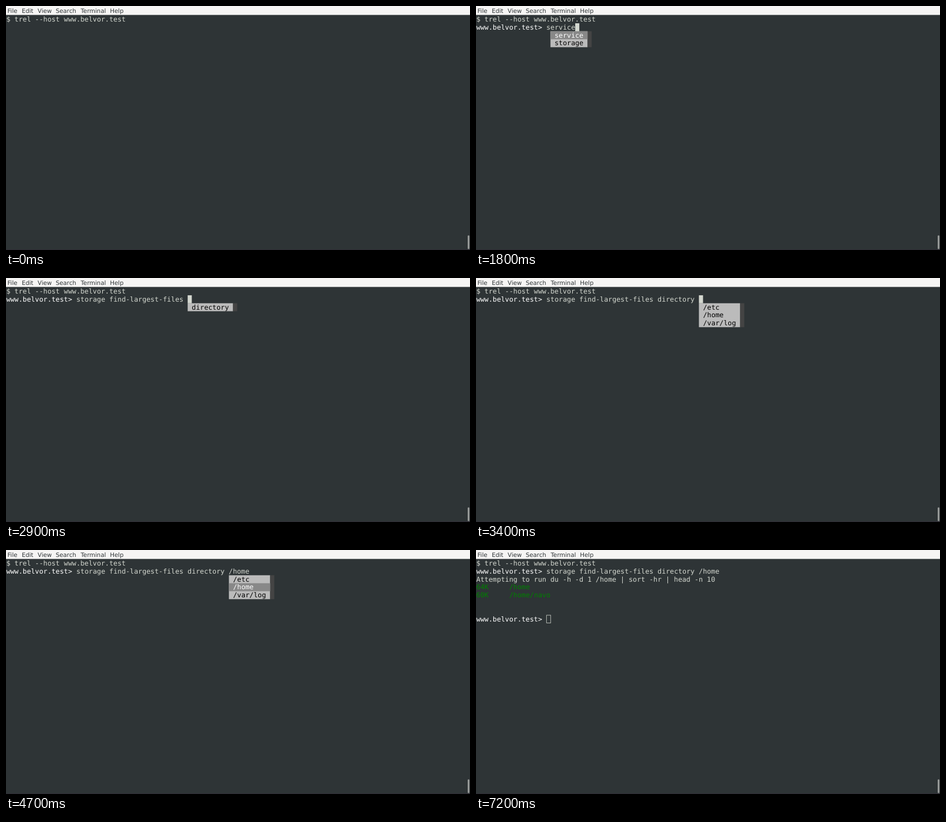
Recreate the animation shown at these times as an HTML page. Size 800 by 423 pixels, loop 7900 ms.

```html
<!DOCTYPE html>
<html lang="en">
<head>
<meta charset="utf-8">
<title>Terminal session</title>
<style>
html, body { margin: 0; width: 100%; height: 100%; overflow: hidden; background: #2e3436; }
svg { display: block; width: 800px; height: 423px; }
text { white-space: pre; text-rendering: geometricPrecision; }
#bar text { font: 10.3px "DejaVu Sans", sans-serif; fill: #2e3436; }
#screen text { font: 11.81px "DejaVu Sans Mono", monospace; }
</style>
</head>
<body>
<svg viewBox="0 0 800 423">
  <rect width="800" height="423" fill="#2e3436"/>
  <g id="bar">
    <rect width="800" height="15.5" fill="#f6f5f4"/>
    <text x="2.4" y="11.7">File</text>
    <text x="27.2" y="11.7">Edit</text>
    <text x="54.6" y="11.7">View</text>
    <text x="85.7" y="11.7">Search</text>
    <text x="128.8" y="11.7">Terminal</text>
    <text x="179.2" y="11.7">Help</text>
  </g>
  <rect y="422" width="800" height="1" fill="#302c36"/>
  <rect x="796" y="397.5" width="3" height="24" rx="1.5" fill="#969998"/>
  <g id="screen"></g>
</svg>
<script>
const LOOP = 7900, CW = 7.11, RH = 13.83, X0 = 0.4, Y0 = 16.1;
const FG = '#d3d7cf', GREEN = '#008000';
const HOST = 'www.belvor.test', PROMPT = HOST + '>', IN = PROMPT.length + 1;

const find = 'storage find-largest-files', dir = find + ' directory';
const areas = { col: IN + 1, items: ['service', 'storage'] };
const actions = { col: IN + 8, items: ['find-largest-files'] };
const options = { col: IN + find.length + 1, items: ['directory'] };
const paths = { col: IN + dir.length + 1, items: ['/etc', '/home', '/var/log'] };
const pick = (menu, sel) => ({ ...menu, sel });

// Each step: start time, stage (0 shell, 1 prompt, 2 running, 3 printing, 4 done),
// typed command, cursor ('on', 'off', 'hollow'), menu
const steps = [
  [0, 0, '', 'off'],
  [300, 0, '', 'on'],
  [400, 0.5, '', 'on'],
  [900, 1, '', 'on'],
  [1000, 1, '', 'off'],
  [1300, 1, 's', 'on'],
  [1400, 1, 's', 'on', areas],
  [1800, 1, 'service', 'on', pick(areas, 0)],
  [1900, 1, 'storage', 'on', pick(areas, 1)],
  [2000, 1, 'storage ', 'on'],
  [2100, 1, 'storage ', 'on', actions],
  [2300, 1, find, 'on', pick(actions, 0)],
  [2900, 1, find + ' ', 'on', options],
  [3200, 1, dir, 'on', pick(options, 0)],
  [3300, 1, dir + ' ', 'on'],
  [3400, 1, dir + ' ', 'on', paths],
  [3900, 1, dir + ' /etc', 'on', pick(paths, 0)],
  [4100, 1, dir + ' /home', 'on', pick(paths, 1)],
  [4700, 1, dir + ' /home', 'off', pick(paths, 1)],
  [5100, 2, dir + ' /home', 'on'],
  [5200, 3, dir + ' /home', 'on'],
  [5300, 4, dir + ' /home', 'on'],
  [5700, 4, dir + ' /home', 'off'],
  [6300, 4, dir + ' /home', 'on'],
  [6900, 4, dir + ' /home', 'off'],
  [7200, 4, dir + ' /home', 'hollow']
];

const px = col => X0 + col * CW;
const py = row => Y0 + row * RH;
const text = (row, col, str, fill = FG) =>
  `<text x="${px(col)}" y="${py(row) + 10.9}" fill="${fill}">${str}</text>`;
const box = (row, col, cols, rows, fill) =>
  `<rect x="${px(col)}" y="${py(row)}" width="${cols * CW}" height="${rows * RH}" fill="${fill}"/>`;

function drawMenu({ col, items, sel }) {
  const width = Math.max(...items.map(s => s.length)) + 2;
  let out = box(2, col, width, items.length, '#bbbbbb') +
            box(2, col + width, 1, items.length, '#444444');
  items.forEach((item, i) => {
    if (i === sel) out += box(2 + i, col, width, 1, '#888888');
    out += text(2 + i, col + 1, item, i === sel ? '#ffffff' : '#000000');
  });
  return out;
}

function drawCursor(stage, typed, look) {
  const [row, col] = {
    0: [0, 29], 0.5: [1, 0], 1: [1, IN + typed.length],
    2: [2, 0], 3: [3, 0], 4: [7, IN]
  }[stage];
  if (look === 'on') return box(row, col, 1, 1, FG);
  if (look === 'off') return '';
  return `<rect x="${px(col) + 0.4}" y="${py(row) + 0.1}" width="${CW}" height="${RH - 0.4}"
    fill="none" stroke="${FG}" stroke-width="0.8"/>`;
}

function draw([, stage, typed, look, menu]) {
  let out = text(0, 0, '$ trel --host ' + HOST);
  if (stage >= 1) out += text(1, 0, PROMPT, '#ffffff') + text(1, IN, typed);
  if (stage >= 3) out += text(2, 0, 'Attempting to run du -h -d 1 /home | sort -hr | head -n 10');
  if (stage >= 4) {
    out += text(3, 0, '64K', GREEN) + text(3, 8, '/home', GREEN) +
           text(4, 0, '60K', GREEN) + text(4, 8, '/home/navo', GREEN) +
           text(7, 0, PROMPT, '#ffffff');
  }
  if (menu) out += drawMenu(menu);
  return out + drawCursor(stage, typed, look);
}

const screen = document.getElementById('screen');
const start = performance.now();
let shown;

function tick() {
  const t = Math.max(0, performance.now() - start) % LOOP;
  const step = steps.findLast(s => s[0] <= t);
  if (step !== shown) screen.innerHTML = draw(shown = step);
  requestAnimationFrame(tick);
}
tick();
</script>
</body>
</html>
```
